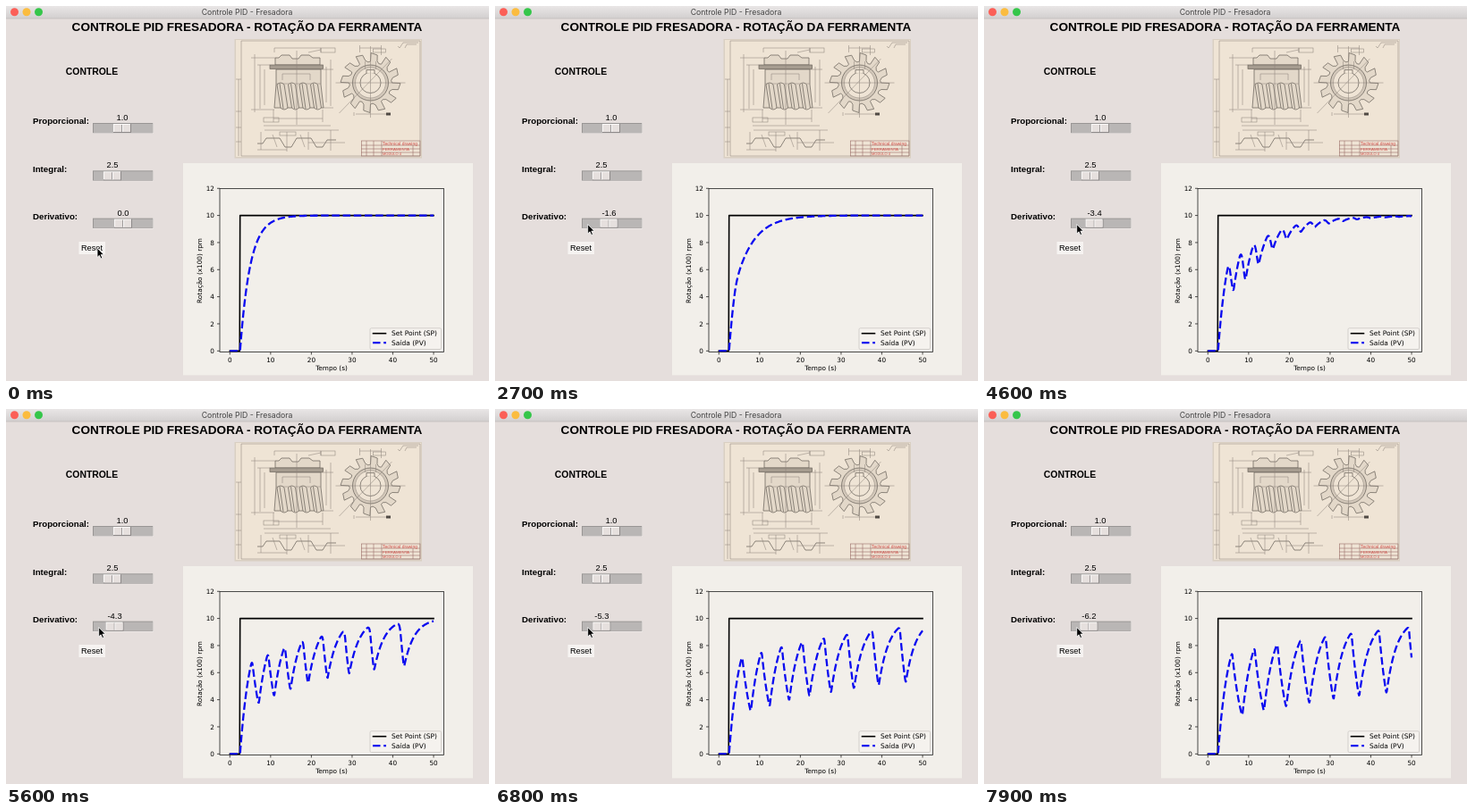
An HTML page that plays this animation: 540 px wide and 420 px high, repeating every 8000 ms.

```html
<!DOCTYPE html>
<html lang="pt">
<head>
<meta charset="utf-8">
<title>Controle PID - Fresadora</title>
<style>
html, body { margin: 0; height: 100%; overflow: hidden; background: #e5dedc; }
svg { display: block; width: 540px; height: 420px; }
text { font-family: "Liberation Sans", Arial, sans-serif; font-size: 9.4px; }
.bold { font-weight: bold; font-size: 9.7px; }
.mid { text-anchor: middle; }
.end { text-anchor: end; }
.plot text { font-family: "DejaVu Sans", sans-serif; font-size: 7.3px; }
.thin { fill: none; stroke: #8f877d; stroke-width: .55; }
.ink { fill: none; stroke: #6b645c; stroke-width: .75; }
.red { fill: none; stroke: #9a6f68; stroke-width: .6; }
</style>
</head>
<body>
<svg id="stage" viewBox="0 0 540 420">
  <defs>
    <linearGradient id="bar" x2="0" y2="1">
      <stop stop-color="#e9e6e6"/><stop offset="1" stop-color="#d2cfcf"/>
    </linearGradient>
  </defs>
  <rect width="540" height="420" fill="#e5dedc"/>
  <rect width="540" height="14" fill="url(#bar)"/>
  <path d="M0 14H540" stroke="#bdb8b7" stroke-width=".7"/>
  <circle cx="9.5" cy="6.7" r="4.5" fill="#fb5f57"/>
  <circle cx="23" cy="6.7" r="4.5" fill="#fbbc3f"/>
  <circle cx="36.5" cy="6.7" r="4.5" fill="#35c64a"/>
  <text class="mid" x="269.5" y="10" fill="#444" style="font:8.7px Inter,sans-serif">Controle PID - Fresadora</text>
  <text class="bold mid" x="269.5" y="27.6" style="font-size:13.57px">CONTROLE PID FRESADORA - ROTAÇÃO DA FERRAMENTA</text>
  <text class="bold mid" x="96" y="77" style="font-size:10.4px">CONTROLE</text>
  <g id="sliders"></g>
  <rect x="81.5" y="264" width="29.5" height="14" fill="#f6f3f1"/>
  <text class="mid" x="96" y="274" style="font-size:9.2px">Reset</text>
  <g id="drawing"></g>
  <g id="plot" class="plot"></g>
  <path id="cursor" d="M0 0V10.5L2.4 8.3L4 12L5.8 11.2L4.2 7.6H7.5Z" stroke="#fff" stroke-width=".8"/>
</svg>
<script>
const $ = id => document.getElementById(id);
const line = (d, cls) => `<path class="${cls}" d="${d}"/>`;
const rect = (x, y, w, h, attrs) => `<rect x="${x}" y="${y}" width="${w}" height="${h}" ${attrs}/>`;
const text = (x, y, s, cls = '', more = '') => `<text x="${x}" y="${y}" class="${cls}" ${more}>${s}</text>`;
const range = (n, f) => Array.from({ length: n }, (_, i) => f(i)).join('');

function slider(label, y, x, value, id) {
  return text(30, y - 3.8, label, 'bold') +
    rect(97, y - 5, 68, 12, 'fill="#f0ebe9"') +
    rect(97, y - 5, 67.3, 11.3, 'fill="#999695"') +
    rect(98, y - 4, 66, 10, 'fill="#b9b6b5"') +
    `<g id="${id}" transform="translate(${x})">` +
    rect(-10, y - 4, 20, 10, 'fill="#8d8989"') +
    rect(-10, y - 4, 19, 9, 'fill="#fbf9f8"') +
    rect(-9, y - 3, 18, 8, 'fill="#e6e0de"') +
    rect(-.8, y - 3, .8, 8, 'fill="#8d8989"') +
    rect(0, y - 3, .8, 8, 'fill="#fff"') +
    text(0, y - 8, value, 'mid') + '</g>';
}
$('sliders').innerHTML = slider('Proporcional:', 136, 130, '1.0', 'kp') +
  slider('Integral:', 189.3, 119, '2.5', 'ki') +
  slider('Derivativo:', 242.6, 131, '0.0', 'kd');

// Blueprint: hob side view, front view, tooth profile and title block
function blueprint() {
  const paper = '#efe4d5', metal = 'style="fill:#e3d8c9"';
  const polar = (r, deg) => {
    const a = deg * Math.PI / 180;
    return `${(r * Math.cos(a)).toFixed(1)} ${(r * Math.sin(a)).toFixed(1)}`;
  };
  const teeth = range(12, i => {
    const a = i * 30;
    return `${i ? 'L' : 'M'}${polar(24, a)}L${polar(33.5, a + 1)}L${polar(32, a + 14)}L${polar(25.5, a + 17)}Q${polar(22, a + 24)} ${polar(24, a + 30)}`;
  });
  return rect(255.5, 37, 209.5, 133.5, 'fill="#d9cfc2"') +
    rect(257, 38, 207, 131, `fill="${paper}"`) +
    line('M263 39H463V168H263ZM257 118H263M257 136H263M257 152H263M257 82H263M260 82V168', 'thin') +
    line('M438 45l2 2l4 -6h17M446 47l2 -4h11', 'thin') +
    // side view
    `<path class="ink" ${metal} d="M301 66V58H305L308 55H317L320 59H327L330 55H339L343 58H351V66Z"/>` +
    `<path class="ink" ${metal} d="M302 71H352V88L355 114H300L302 88Z"/>` +
    rect(295, 66, 59.5, 4.5, 'fill="#a69c90" stroke="#6b645c" stroke-width=".7"') +
    line('M302 87H352M309 83v-7h31v7', 'thin') +
    range(4, i => {
      const x = 303 + i * 12.5;
      return `<path class="ink" ${metal} d="M${x} 88q4 -4 8 0l4 26q-4 4 -8 0Z"/>` +
        line(`M${x + 3} 87l4 28`, 'ink');
    }) +
    line('M274 58H301M278 54V119M274 116H300M284 66V115M281 66H295M289 71V111M363 60V112M358 68V108M352 71H366M355 114H366M299 116V130M354 116V130M299 126H354M325 50V133M300 52V47H352V52', 'thin') +
    rect(352, 47, 16, 5, 'class="thin"') + rect(288, 125, 17, 5, 'class="thin"') +
    line('M338 52L352 49M288 134H363', 'thin') +
    // front view
    '<g transform="translate(407.5 86)">' +
    `<path class="ink" ${metal} d="${teeth}Z"/>` +
    `<circle r="20" class="ink" style="fill:#d3c8ba"/><circle r="17" class="thin" style="fill:${paper}"/>` +
    '<circle r="11.5" class="ink"/>' +
    `<path class="ink" style="fill:${paper}" d="M-4.5 -10.5V-14.5H4.5V-10.5"/>` +
    line('M-39 0H39M0 -41V39M-12 -34V-42M12 -31V-42M-12 -39H12M-6 -15V-24M6 -15V-24M-35 34L24 -27', 'thin') +
    rect(3, -38, 14, 4, 'class="thin"') + '</g>' +
    line('M391 121H426M389 119v4', 'thin') + rect(425, 119.5, 5, 3, 'fill="#514b45"') +
    // tooth profile
    line('M281 154H287L291 148H306L312 158H319L325 148H341L347 158H354L359 150H369', 'ink') +
    line('M285 141V161M289 139H372M314 141V163M338 141V161M281 161H314M338 153H379M363 139V162M298 144L303 158M329 144L334 158', 'thin') +
    rect(306, 141, 18, 4, 'class="thin"') +
    // title block
    rect(397.5, 151, 65.5, 17, 'class="red"') +
    line('M397 156H463M397 160H463M397 164H463M403 151V168M411 151V168M420 151V168M455 156V168', 'red') +
    text(421, 155.5, 'Technical drawing', '', 'fill="#d0524c" style="font-size:4.9px"') +
    text(421, 162, 'FERRAMENTA', '', 'fill="#d0524c" style="font-size:4.4px"') +
    text(421, 167, 'MODULO 4', '', 'fill="#d0524c" style="font-size:4px"');
}
$('drawing').innerHTML = blueprint();

// Chart
const px = t => 250.3 + t * 4.555;
const py = v => 386.3 - v * 15.17;
const frame = 'fill="none" stroke="#222" stroke-width=".8"';
$('plot').innerHTML = rect(198, 176, 324, 237.5, 'fill="#f2efea"') +
  range(6, i => {
    const x = px(i * 10);
    return `<path d="M${x} 387.5v3" ${frame}/>` + text(x, 398.8, i * 10, 'mid');
  }) +
  range(7, i => {
    const y = py(i * 2);
    return `<path d="M239 ${y}h-3" ${frame}/>` + text(233, y + 2.7, i * 2, 'end');
  }) +
  text(364, 408, 'Tempo (s)', 'mid') +
  text(0, 0, 'Rotação (x100) rpm', 'mid', 'transform="translate(218.5 296.5) rotate(-90)"') +
  `<path d="M${px(0)} ${py(0)}H${px(2.4)}L${px(2.5)} ${py(10)}H${px(50)}" fill="none" stroke="#000" stroke-width="1.6" stroke-linejoin="round" stroke-linecap="square"/>` +
  '<path id="pv" fill="none" stroke="#0a0af0" stroke-width="2.3" stroke-linejoin="round" stroke-dasharray="8.5 3.7"/>' +
  rect(239, 204.5, 250.5, 183, frame) +
  rect(407, 360.8, 79.5, 23.7, 'rx="1.5" fill="#f5f2ee" stroke="#ccc8c4" stroke-width=".8"') +
  '<path d="M410.5 366.7h14" stroke="#000" stroke-width="1.6" stroke-linecap="square"/>' +
  '<path d="M410 377.2h15" stroke="#0a0af0" stroke-width="2.3" stroke-dasharray="8.5 3.7"/>' +
  text(431, 369.4, 'Set Point (SP)', '', 'style="font-size:7.5px"') +
  text(431, 380, 'Saída (PV)', '', 'style="font-size:7.5px"');

// First-order process under a clamped PID with anti-windup
function response(kd) {
  const kc = 1, ti = 2.5, tau = 2.5, dt = .1, decay = Math.exp(-dt / tau);
  let pv = 0, integral = 0, out = 0, d = `M${px(0)} ${py(0)}`;
  for (let i = 1; i <= 500; i++) {
    const last = pv;
    pv = out + (pv - out) * decay;
    const error = (i >= 25 ? 10 : 0) - pv;
    const step = kc / ti * error * dt;
    const raw = kc * error + integral + step - kc * kd * (pv - last) / dt;
    out = Math.min(10, Math.max(0, raw));
    if (raw === out) integral += step;
    d += `L${px(i * dt).toFixed(2)} ${py(pv).toFixed(2)}`;
  }
  return d;
}

// Piecewise linear track: [time, value] pairs
function track(keys, t) {
  const i = keys.findIndex(k => k[0] > t);
  if (i < 0) return keys[keys.length - 1][1];
  if (!i) return keys[0][1];
  const [t0, a] = keys[i - 1], [t1, b] = keys[i];
  return a + (b - a) * (t - t0) / (t1 - t0);
}
const gainKeys = [[800, 0], [1400, -.5], [2700, -1.6], [4600, -3.4], [5600, -4.3], [6800, -5.3], [7900, -6.2]];
const cursorX = [[100, 102], [700, 111.5], [1900, 111.5], [2400, 103.7]];
const cursorY = [[100, 271], [700, 245], [1900, 245], [2400, 244.5]];
const gain = t => Math.round(track(gainKeys, t) * 10) / 10 || 0;
const chartLag = 200; // the chart redraws a little after the slider moves

function draw(now) {
  const t = Math.floor(now % 8000 / 100) * 100;
  const kd = gain(t);
  $('cursor').setAttribute('transform', `translate(${track(cursorX, t)} ${track(cursorY, t)})`);
  $('kd').setAttribute('transform', `translate(${131 + kd * 2.2})`);
  $('kd').querySelector('text').textContent = kd.toFixed(1);
  $('pv').setAttribute('d', response(gain(t - chartLag)));
  requestAnimationFrame(draw);
}
draw(performance.now());
</script>
</body>
</html>
```
